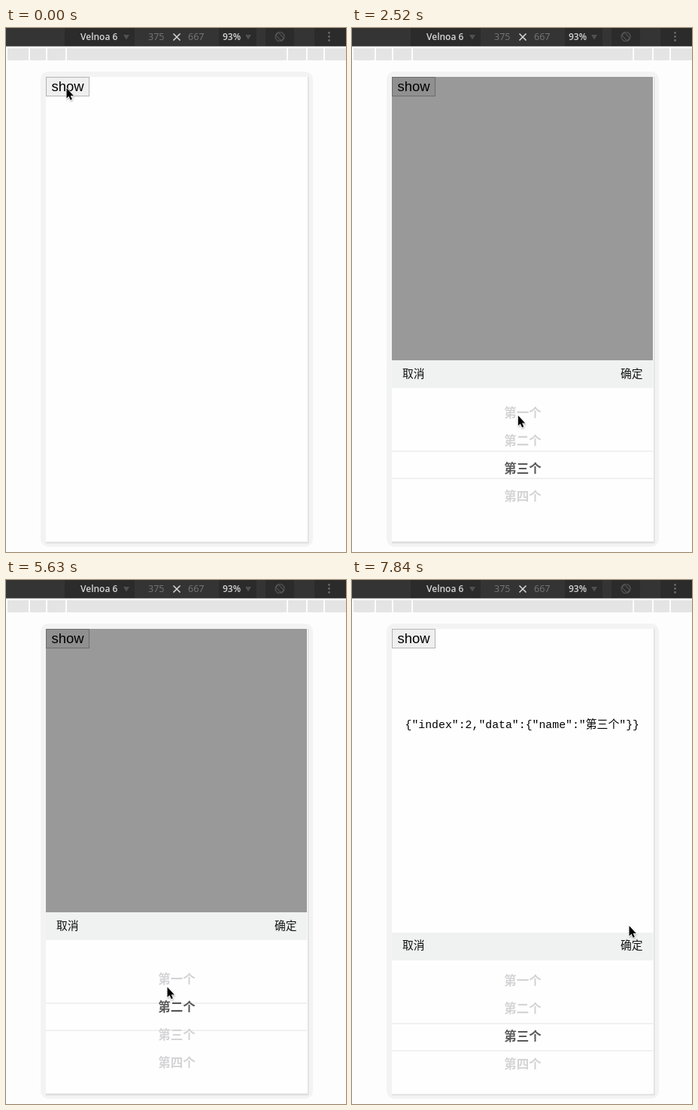
Recreate the animation shown at these times as an HTML page. Size 452x697 px, loop 7.99 s.

```html
<!DOCTYPE html>
<html lang="zh">
<head>
<meta charset="utf-8">
<title>Picker</title>
<style>
html, body { margin: 0; width: 100%; height: 100%; overflow: hidden; background: #fdfdfd; }
svg { display: block; width: 100vw; height: 100vh; }
.bar { font: 600 12px "Open Sans", sans-serif; fill: #d6d6d6; }
.bar .dim { font-weight: 400; font-size: 12.5px; fill: #777; }
.show { font: 18.4px "Liberation Sans", Arial, sans-serif; }
.json { font: 14.83px "Liberation Mono", "Noto Sans CJK SC", monospace; }
.head { font: 14.8px "Noto Sans CJK SC", "Noto Sans CJK", sans-serif; fill: #111; }
.list { font: 700 16.5px "Noto Sans CJK SC", "Noto Sans CJK", sans-serif; text-anchor: middle; }
</style>
</head>
<body>
<svg viewBox="0 0 452 697" preserveAspectRatio="none">
  <defs>
    <clipPath id="screen"><rect x="53" y="65" width="347.5" height="618.5"/></clipPath>
    <clipPath id="wheel"><rect x="53" y="479" width="347" height="205"/></clipPath>
    <filter id="soft" x="-50%" y="-50%" width="200%" height="200%">
      <feDropShadow dx="0.5" dy="1.5" stdDeviation="1" flood-opacity=".3"/>
    </filter>
  </defs>

  <g class="bar">
    <rect width="452" height="24" fill="#343434"/>
    <rect y="24" width="452" height="1" fill="#a3a3a3"/>
    <path d="M78 0h93v24h-93zM283 0h50v24h-50zM345 0h38v24h-38zM410 0h42v24h-42z" fill="#2b2b2b"/>
    <text x="99" y="16">Velnoa 6</text>
    <text class="dim" x="189" y="16">375</text>
    <text class="dim" x="242" y="16">667</text>
    <text x="288" y="16">93%</text>
    <path d="M156 9h8l-4 6.5zM318 9h8l-4 6.5z" fill="#505050"/>
    <path d="M222.5 7.5l9 9m0-9l-9 9" stroke="#d5d5d5" stroke-width="1.6"/>
    <g fill="none" stroke="#555" stroke-width="1.2" transform="translate(364 11.5) rotate(-45)">
      <circle r="6"/>
      <rect x="-2.5" y="-5" width="5" height="10" rx="1"/>
    </g>
    <path d="M429.5 6.5v10.1" stroke="#6a6a6a" stroke-width="2.8" stroke-linecap="round" stroke-dasharray="0 5"/>
  </g>
  <g id="ruler" fill="#e4e4e4"></g>

  <rect x="46" y="58" width="362" height="632" rx="10" fill="#f3f3f3"/>
  <rect x="53" y="65" width="349.5" height="620.5" fill="#dedede"/>
  <rect x="53" y="65" width="348" height="618.5" fill="#fefefe"/>

  <g clip-path="url(#screen)">
    <rect id="button" x="53.5" y="65.5" width="57" height="25"/>
    <text class="show" x="60.5" y="84">show</text>
    <text id="json" class="json" x="70.5" y="197">{"index":2,"data":{"name":"第三个"}}</text>
    <rect id="shade" x="53" y="65" width="347" height="619" opacity=".4"/>
    <g id="panel">
      <rect x="53" y="442" width="347.5" height="242" fill="#fefefe"/>
      <rect x="53" y="442" width="347.5" height="37" fill="#f0f1f1"/>
      <g class="head">
        <text x="67" y="464.5">取消</text>
        <text x="357" y="464.5">确定</text>
      </g>
      <path d="M53 563h347M53 599.3h347" stroke="#ededed" stroke-width="1.5"/>
      <g clip-path="url(#wheel)"><g id="list" class="list"></g></g>
    </g>
  </g>
  <path id="cursor" d="M0 0V13.5L3 10.8 5.2 15.8 7.4 14.8 5.2 10H9.3Z"
    stroke="#fff" stroke-width="1.2" paint-order="stroke" filter="url(#soft)"/>
</svg>
<script>
const LOOP = 7990, TICK = 148, LAST = 53;
const ROW = 37, CENTER = 580, HEIGHT = 242, EASE_MS = 300;
const OPEN = 663, CLOSE = 7779;

// The pointer glides to each stop and waits there.
const home = { x: 81, y: 80 };
const glides = [
  { from: 50, to: 300, x: 81, y: 78 },
  { from: 740, to: 1184, x: 151, y: 333 },
  { from: 1332, to: 1924, x: 226, y: 596 },
  { from: 2072, to: 2720, x: 220, y: 492 },
  { from: 3256, to: 3552, x: 217, y: 558 },
  { from: 3552, to: 4292, x: 218, y: 563 },
  { from: 5032, to: 6216, x: 212, y: 520 },
  { from: 6364, to: 7548, x: 369, y: 460 }
];
// While held, the list follows the pointer; on release it snaps to a row.
const drags = [{ from: 2220, to: 2960 }, { from: 3380, to: 5920 }];

const $ = id => document.getElementById(id);
const mix = (a, b, p) => a + (b - a) * p;

function ease(t, from, to) {
  const p = Math.min(1, Math.max(0, (t - from) / (to - from)));
  return (1 - Math.cos(Math.PI * p)) / 2;
}

function pointer(t) {
  return glides.reduce((pos, g) => {
    const p = ease(t, g.from, g.to);
    return { x: mix(pos.x, g.x, p), y: mix(pos.y, g.y, p) };
  }, home);
}

function listTop(t) {
  let top = CENTER;
  for (const d of drags) {
    if (t < d.from) break;
    const held = top + pointer(Math.min(t, d.to)).y - pointer(d.from).y;
    const snapped = CENTER - ROW * nearest(held);
    top = mix(held, snapped, ease(t, d.to, d.to + EASE_MS));
  }
  return top;
}

function nearest(top) {
  return Math.round((CENTER - top) / ROW);
}

function add(parent, tag, attrs) {
  const el = document.createElementNS('http://www.w3.org/2000/svg', tag);
  for (const name in attrs) el.setAttribute(name, attrs[name]);
  return $(parent).appendChild(el);
}

const rows = ['第一个', '第二个', '第三个', '第四个'].map((label, i) => {
  const row = add('list', 'text', { x: 227, y: i * ROW + 6 });
  row.textContent = label;
  return row;
});

[0, 30, 53, 79, 373, 399, 422, 452].forEach((x, i, ends) => {
  if (i) add('ruler', 'rect', { x: ends[i - 1] + 2, y: 27, width: x - ends[i - 1] - 2, height: 16 });
});

function move(id, x, y) {
  $(id).setAttribute('transform', `translate(${x} ${y})`);
}

function show(id, on) {
  $(id).style.display = on ? '' : 'none';
}

function draw(ms) {
  // The screen refreshes in even ticks.
  const t = TICK * Math.min(LAST, Math.floor((ms % LOOP + 8) / TICK));
  const { x, y } = pointer(t);
  const top = listTop(t);
  const hidden = 1 - ease(t, OPEN, OPEN + EASE_MS) + ease(t, CLOSE, CLOSE + EASE_MS);
  const opened = t > OPEN, closing = t > CLOSE;
  const pressed = opened && t < OPEN + TICK;

  move('cursor', x - 0.5, y);
  move('list', 0, top);
  move('panel', 0, HEIGHT * hidden);
  rows.forEach((row, i) => row.setAttribute('fill', i === nearest(top) ? '#595959' : '#d4d4d6'));
  $('button').setAttribute('fill', pressed ? '#bcbcbc' : '#eeefee');
  $('button').setAttribute('stroke', pressed ? '#bcbcbc' : '#b4b4b4');
  show('panel', opened);
  show('shade', opened && !closing);
  show('json', closing);
}

const start = performance.now();
function loop() {
  draw(performance.now() - start);
  requestAnimationFrame(loop);
}
loop();
</script>
</body>
</html>
```
